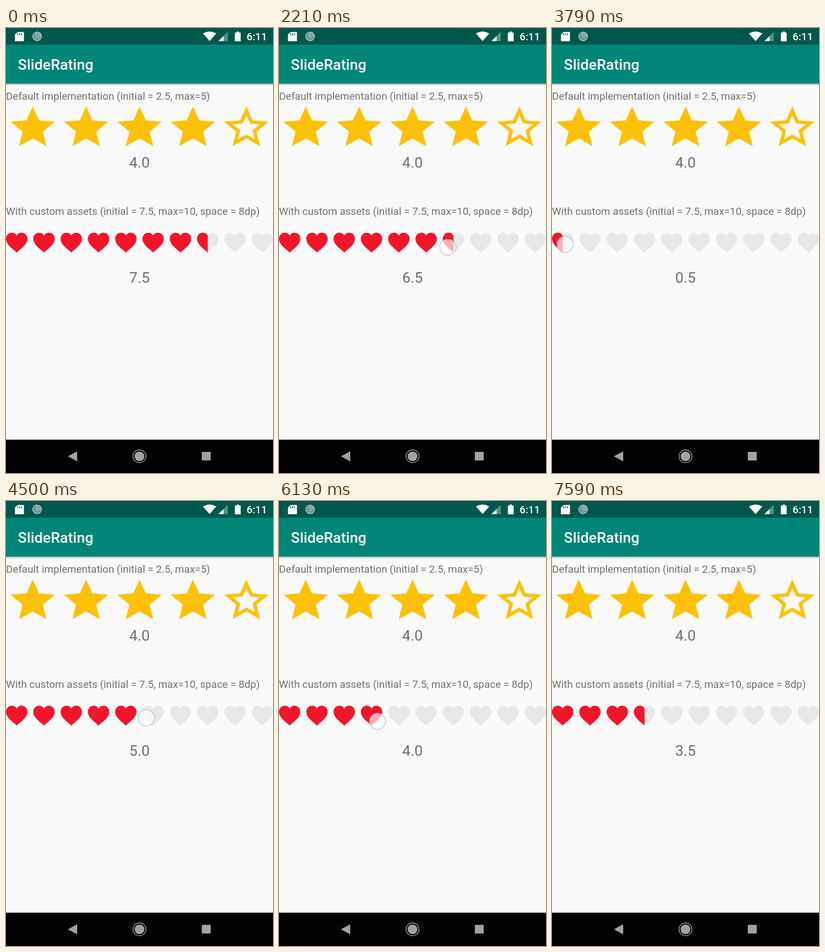
Recreate the animation shown at these times as an HTML page. Size 480 by 800 pixels, loop 8000 ms.

```html
<!DOCTYPE html>
<html lang="en">
<head>
<meta charset="utf-8">
<title>SlideRating</title>
<style>
  html, body { margin: 0; width: 100%; height: 100%; overflow: hidden; background: #fafafa; }
  svg { display: block; width: 100vw; height: 100vh; font-family: Roboto, sans-serif; }
  .label { font-size: 14px; fill: #70706c; }
  .value { font-size: 20px; fill: #6e6e6c; text-anchor: middle; }
  .bold { font-weight: 500; fill: #fff; }
</style>
</head>
<body>
<!-- A 360 x 640 dp screen shown on the whole stage -->
<svg viewBox="0 0 360 640" preserveAspectRatio="none">
  <defs>
    <path id="star" d="M12 17.27L18.18 21l-1.64-7.03L22 9.24l-7.19-.61L12 2 9.19 8.63 2 9.24l5.46 4.73L5.82 21z"/>
    <path id="starHole" d="M12 15.4l-3.76 2.27 1-4.28-3.32-2.88 4.38-.38L12 6.1l1.71 4.04 4.38.38-3.32 2.88 1 4.28z"/>
    <path id="heart" d="M14.4 28.8C12.2 25 0 18.4 0 8.8C0 3.6 3.6 0 8 0C10.9 0 13.3 1.7 14.4 4.3C15.5 1.7 17.9 0 20.8 0C25.2 0 28.8 3.6 28.8 8.8C28.8 18.4 16.6 25 14.4 28.8z"/>
    <linearGradient id="shade" x2="0" y2="1">
      <stop stop-color="#444" stop-opacity=".35"/>
      <stop offset="1" stop-color="#444" stop-opacity="0"/>
    </linearGradient>
    <clipPath id="filled"><rect id="fillBox" y="290" height="40"/></clipPath>
  </defs>

  <rect width="360" height="640" fill="#fafafa"/>
  <rect y="80" width="360" height="3.5" fill="url(#shade)"/>
  <rect y="24" width="360" height="56" fill="#008577"/>
  <rect width="360" height="24" fill="#00574b"/>

  <g fill="#fff">
    <path d="M16 5.6h7.4q.8 0 .8.8v11.8q0 .8-.8.8H12.8q-.8 0-.8-.8V9.4z"/>
    <path d="M15.8 7.6v2.8M18.4 7.6v2.8M21 7.6v2.8" stroke="#00574b" stroke-width="1.1"/>
    <path d="M265.5 7.8Q274.5 2 283.5 7.8L274.5 18.8z"/>
    <path d="M299 5.6V18.8H286.4z" opacity=".35"/>
    <path d="M293.4 11.5V18.8H286.4z"/>
    <path d="M310.8 5.2h3.4v1.3h2.2v12.7h-7.8V6.5h2.2z"/>
  </g>
  <ellipse cx="42" cy="12" rx="6" ry="6.4" fill="#80aba5" stroke="#a0c0bb"/>
  <path d="M39 7.8A4.6 4.8 0 1 0 46.6 13" fill="none" stroke="#4d8981" stroke-width="1.3"/>
  <text class="bold" x="324.4" y="17.3" font-size="14">6:11</text>
  <text class="bold" x="16" y="59.7" font-size="20">SlideRating</text>

  <text class="label" x="0" y="103.2">Default implementation (initial = 2.5, max=5)</text>
  <g id="stars" fill="#ffc107"></g>
  <text class="value" x="180" y="200.5">4.0</text>

  <text class="label" x="0" y="268.9">With custom assets (initial = 7.5, max=10, space = 8dp)</text>
  <g id="emptyHearts" fill="#e8e8e8"></g>
  <g clip-path="url(#filled)"><g id="fullHearts" fill="#f2152a"></g></g>
  <text class="value" id="rating" x="180" y="366.4">7.5</text>

  <g id="touch">
    <ellipse rx="11" ry="11.7" fill="#fff" fill-opacity=".66" stroke="#85899c" stroke-opacity=".5" stroke-width=".9"/>
  </g>

  <rect y="592" width="360" height="48" fill="#000"/>
  <g fill="#a2a2a2">
    <path d="M83.5 616L96 608.8V623.2z"/>
    <ellipse cx="180" cy="616" rx="6.6" ry="7"/>
    <ellipse cx="180" cy="616" rx="8.7" ry="9.2" fill="none" stroke="#a2a2a2" stroke-width="1.1"/>
    <rect x="264" y="609.6" width="12" height="12.4" rx=".8"/>
  </g>
</svg>
<script>
const LOOP = 8000, HEART = 28.8, PITCH = 36.8;
const PRESS = 2040, RELEASE = 6920, FADE = 200;
const LAG = 30; // the rating trails the finger by this many ms

// Finger path: time in ms, x and y in dp
const path = [
  [2040, 268, 315.6], [2210, 228, 315.2], [2840, 74, 313.2], [3200, 10, 311.6],
  [3690, 8, 311], [3790, 17.25, 311.2], [4150, 98, 311.6], [4500, 189, 312],
  [4850, 250, 313], [5020, 250, 314], [5380, 165.8, 315.2], [5600, 143, 316],
  [6130, 132.8, 316.8], [6340, 124.9, 315.2], [6920, 122, 315.2]
];

const $ = id => document.getElementById(id);

function addUse(parent, shape, transform, fill) {
  const use = document.createElementNS("http://www.w3.org/2000/svg", "use");
  use.setAttribute("href", "#" + shape);
  use.setAttribute("transform", transform);
  if (fill) use.setAttribute("fill", fill);
  $(parent).append(use);
}

for (let i = 0; i < 5; i++) addUse("stars", "star", `translate(${i * 72} 107) scale(3)`);
addUse("stars", "starHole", "translate(288 107) scale(3)", "#fafafa");
for (let i = 0; i < 10; i++) {
  for (const row of ["emptyHearts", "fullHearts"]) addUse(row, "heart", `translate(${i * PITCH} 294.4)`);
}

function fingerAt(t) {
  const time = Math.min(Math.max(t, PRESS), RELEASE);
  const i = Math.max(1, path.findIndex(p => p[0] >= time));
  const [t0, x0, y0] = path[i - 1], [t1, x1, y1] = path[i];
  const k = (time - t0) / (t1 - t0);
  return [x0 + (x1 - x0) * k, y0 + (y1 - y0) * k];
}

// Any touched half counts as filled
const ratingAt = x => Math.ceil(x / PITCH * 2) / 2;

function touchOpacity(t) {
  if (t < PRESS) return 0;
  return Math.min(1, Math.max(0, 1 - (t - RELEASE) / FADE));
}

function draw(now) {
  const t = now % LOOP;
  const [x, y] = fingerAt(t);
  const rating = ratingAt(fingerAt(t - LAG)[0]);
  const whole = Math.floor(rating);
  $("fillBox").setAttribute("width", whole * PITCH + (rating - whole) * HEART);
  $("rating").textContent = rating.toFixed(1);
  $("touch").setAttribute("transform", `translate(${x} ${y})`);
  $("touch").setAttribute("opacity", touchOpacity(t));
}

const start = performance.now();
function tick() {
  draw(performance.now() - start);
  requestAnimationFrame(tick);
}
tick();
</script>
</body>
</html>
```
